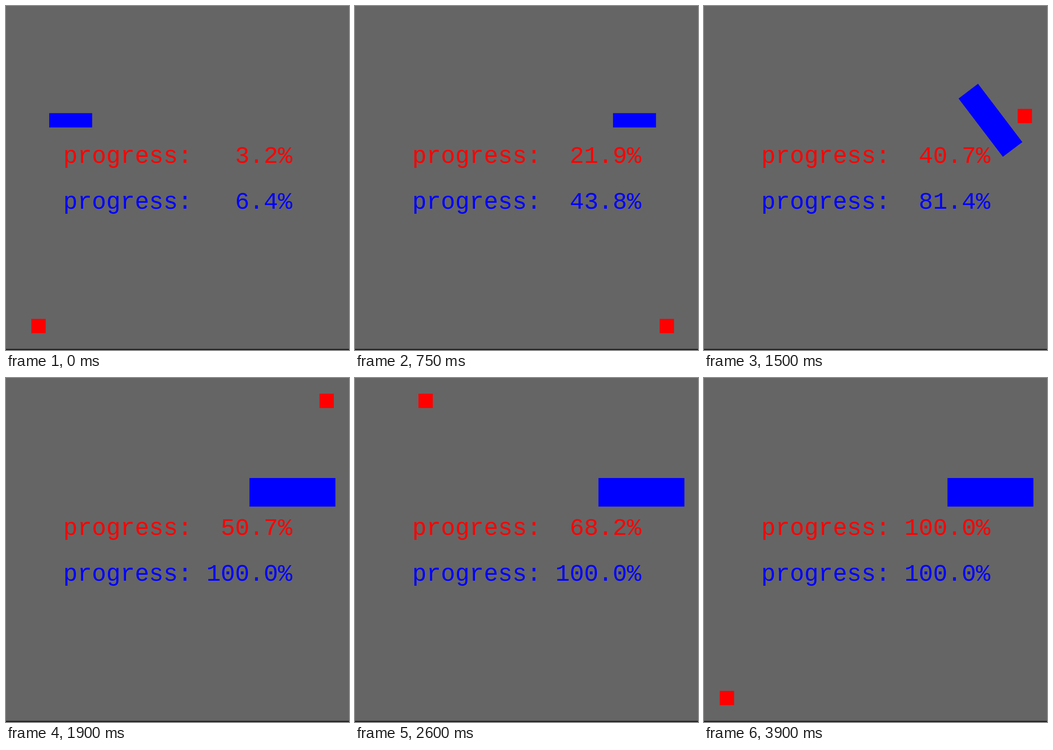
These frames come from a looping animation (746x750 px, 4100 ms). An HTML page:

```html
<!DOCTYPE html>
<html lang="en">
<head>
<meta charset="utf-8">
<title>Progress</title>
<style>
  html, body { margin: 0; width: 100%; height: 100%; overflow: hidden; background: #1e1e1e; }
  svg { display: block; width: 746px; height: 750px; }
  text { font: 83.3px "Liberation Mono", monospace; white-space: pre; }
</style>
</head>
<body>
<svg viewBox="0 0 746 750">
  <g transform="scale(.623)">
    <rect width="1200" height="1200" fill="#656565"/>
    <rect id="square" x="-25" y="-25" width="50" height="50" fill="#f00"/>
    <rect id="bar" x="-75" y="-25" width="150" height="50" fill="#00f"/>
    <text id="redLabel" x="200" y="549.5" fill="#f00" xml:space="preserve"></text>
    <text id="blueLabel" x="200" y="709.5" fill="#00f" xml:space="preserve"></text>
  </g>
</svg>
<script>
const LOOP = 4100, LAST = 3900, STEP = 50;
const HEAD_START = 127; // ms already elapsed when the loop begins
const LEG = 1000, LEG_DELAY = 10;
const CORNERS = [[80, 1120], [1120, 1120], [1120, 80], [80, 80], [80, 1120]];

const $ = id => document.getElementById(id);
const square = $('square'), bar = $('bar'), redLabel = $('redLabel'), blueLabel = $('blueLabel');

const clamp = u => Math.max(0, Math.min(1, u));
const mix = (a, b, f) => a + (b - a) * f;
const ease = u => u < .5 ? 2 * u * u : 1 - 2 * (1 - u) ** 2;

// Eased progress of one leg; legs after the first start slightly late.
const legProgress = (elapsed, leg) =>
  ease(clamp((elapsed - leg * LEG - (leg ? LEG_DELAY : 0)) / LEG));

function roundHalfEven(n) {
  const low = Math.floor(n);
  return n - low === .5 ? low + low % 2 : Math.round(n);
}

function label(elapsed, duration) {
  const tenths = roundHalfEven(Math.min(1000, elapsed * 1000 / duration));
  return 'progress: ' + (tenths / 10).toFixed(1).padStart(5, '\u00a0') + '%';
}

function draw(t) {
  const elapsed = t + HEAD_START;

  const leg = Math.min(3, Math.floor(elapsed / LEG));
  const f = legProgress(elapsed, leg);
  const [from, to] = [CORNERS[leg], CORNERS[leg + 1]];
  square.setAttribute('transform', `translate(${mix(from[0], to[0], f)} ${mix(from[1], to[1], f)})`);

  const slide = legProgress(elapsed, 0), turn = legProgress(elapsed, 1);
  bar.setAttribute('transform',
    `translate(${mix(200, 1000, slide)} 400) rotate(${-180 * turn}) scale(${1 + turn})`);

  redLabel.textContent = label(elapsed, 4 * LEG);
  blueLabel.textContent = label(elapsed, 2 * LEG);
}

const start = performance.now();
function tick() {
  const t = Math.min(LAST, (performance.now() - start) % LOOP);
  draw(Math.floor(t / STEP) * STEP);
  requestAnimationFrame(tick);
}
tick();
</script>
</body>
</html>
```
